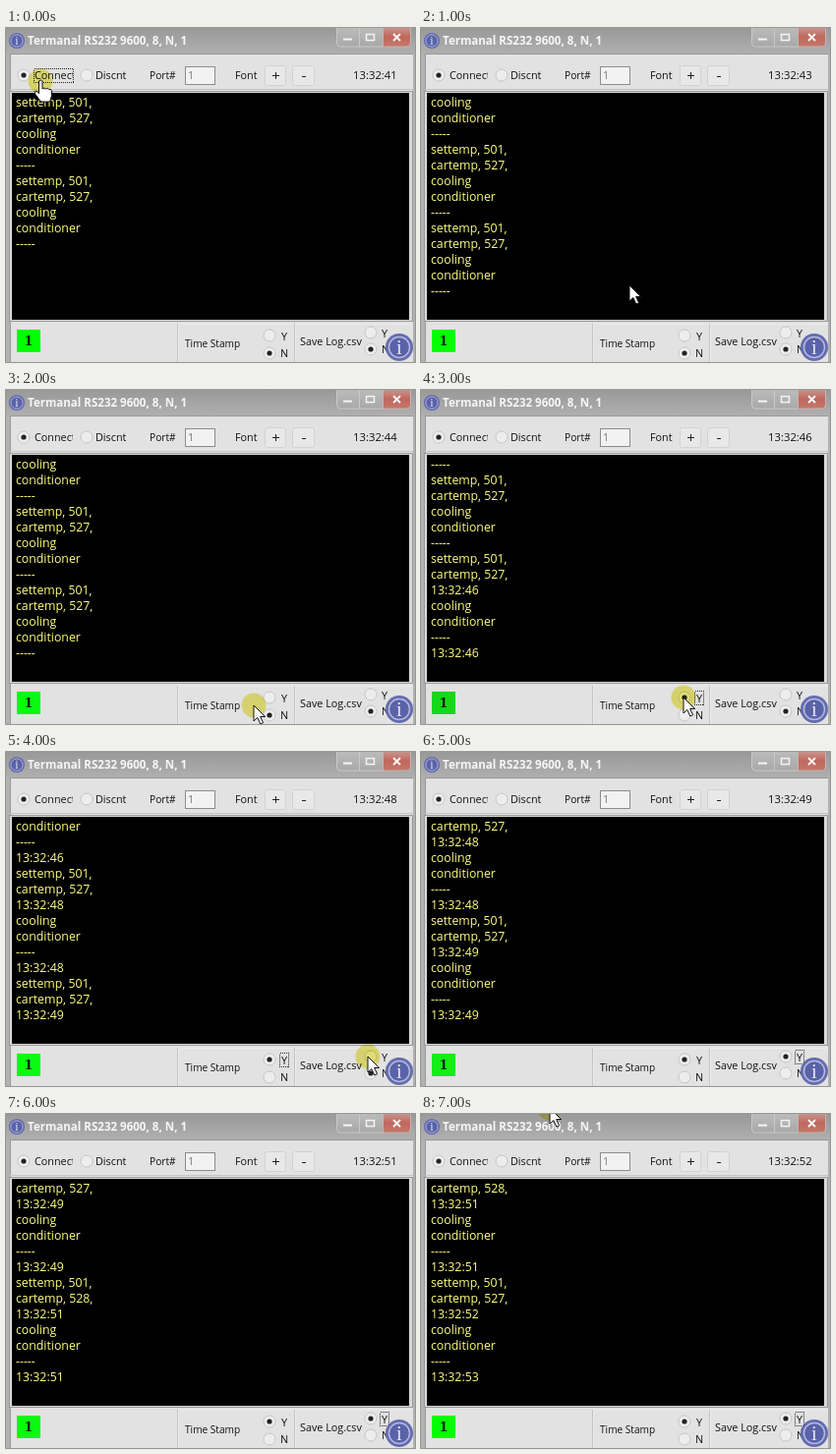
These frames come from a looping animation (416 by 340 pixels, 8000 ms). An HTML page:

```html
<!DOCTYPE html>
<html lang="en">
<head>
<meta charset="utf-8">
<title>Serial terminal</title>
<style>
  html, body { margin: 0; width: 100%; height: 100%; overflow: hidden; background: #b2b2b2; }
  svg { display: block; width: 416px; height: 340px; font: 10.8px "Open Sans", sans-serif; fill: #111; }
  text { white-space: pre; }
  .title { font-weight: 700; font-size: 11.55px; fill: #f6f6f6; }
  .log { font-size: 12.3px; fill: #ffff80; }
  .glass { fill: url(#glass); stroke: #c9c9c9; }
  .key { fill: #e8e8e8; stroke: #d2d2d2; }
  .ring { fill: #ededed; stroke: #c6c6c6; }
  .focus { fill: none; stroke: #222; stroke-dasharray: 1 1; shape-rendering: crispEdges; }
  .halo { fill: #ece650; opacity: .75; }
  .pointer { fill: #fff; stroke: #111; stroke-linejoin: round; }
  .info { font: 21px "Liberation Serif", serif; fill: #e2e4f4; text-anchor: middle; }
</style>
</head>
<body>
<svg viewBox="0 0 416 340">
  <defs>
    <linearGradient id="bar" x2="0" y2="1">
      <stop stop-color="#999"/><stop offset="1" stop-color="#b0b0b0"/>
    </linearGradient>
    <linearGradient id="glass" x2="0" y2="1">
      <stop stop-color="#bcbcbc"/><stop offset="1" stop-color="#a8a8a8"/>
    </linearGradient>
    <linearGradient id="red" x2="0" y2="1">
      <stop stop-color="#c89890"/><stop offset=".5" stop-color="#c0685c"/>
      <stop offset="1" stop-color="#c4786c"/>
    </linearGradient>
    <clipPath id="connectClip"><path d="M28 38h40v20H28z"/></clipPath>
    <g id="badge">
      <circle r="14" fill="#646cb0"/>
      <circle r="10.500" fill="#5a62a8" stroke="#b4badf" stroke-width="1.500"/>
      <text class="info" y="7">i</text>
    </g>
  </defs>

  <rect width="416" height="340" fill="#b2b2b2"/>
  <rect width="416" height="27" fill="url(#bar)"/>
  <use href="#badge" transform="translate(11 13) scale(.58)"/>
  <text class="title" x="22" y="17">Termanal RS232 9600, 8, N, 1</text>

  <path class="glass" d="M336.500-1v16q0 4 4 4h19V-1zM359.500-1h24v20h-24z"/>
  <path d="M383.500-1h28v16q0 4-4 4h-24z" fill="url(#red)" stroke="#c9b4b0"/>
  <path d="M343 11.500h9" stroke="#f4f4f4" stroke-width="2"/>
  <rect x="366.500" y="6.500" width="8" height="6" fill="none" stroke="#f4f4f4" stroke-width="1.500"/>
  <path d="M394 6l7 7m0-7l-7 7" stroke="#f4f4f4" stroke-width="2"/>

  <rect x="4" y="27" width="410" height="313" fill="#e2e2e2"/>
  <path d="M4 26.500h410M4.500 26v314" stroke="#999"/>
  <path d="M4 62.500h410" stroke="#c4c4c4"/>

  <g id="radios"></g>
  <text x="29" y="52" clip-path="url(#connectClip)">Connect</text>
  <text x="91" y="52">Discnt</text>
  <text x="146" y="52" font-size="10.200">Port#</text>
  <rect x="182.500" y="39.500" width="30" height="18" fill="#f2f2f2" stroke="#8c8c8c"/>
  <text x="185" y="52" fill="#777">1</text>
  <text x="233" y="52">Font</text>
  <rect class="key" x="263.500" y="38.500" width="21" height="20" rx="2"/>
  <rect class="key" x="291.500" y="38.500" width="22" height="20" rx="2"/>
  <path d="M271 48.500h7m-3.500-3.500v7M301 49.500h4" stroke="#222"/>
  <text id="clock" x="353" y="52" font-size="11.300"></text>

  <rect x="3.500" y="64.500" width="410" height="234" fill="#d8d8d8" stroke="#9a9a9a"/>
  <rect x="6" y="66" width="404" height="231" fill="#000"/>
  <g id="log" class="log"></g>

  <path d="M174.500 340v-39M293.500 340v-39" stroke="#c4c4c4"/>
  <path d="M175.500 340v-38.500H293M294.500 340v-38.500H414" fill="none" stroke="#ececec"/>
  <rect id="lamp" x="11" y="307" width="24" height="23"/>
  <text x="23" y="323" text-anchor="middle" font-family="DejaVu Serif, Noto Serif, serif" font-weight="700" font-size="12">1</text>
  <text x="182" y="325" font-size="10.100">Time Stamp</text>
  <text x="299" y="323">Save Log.csv</text>
  <text x="280" y="318">Y</text><text x="279" y="335">N</text>
  <text x="382" y="315">Y</text><text x="382" y="331">N</text>

  <rect id="focus" class="focus"/>
  <use href="#badge" x="400" y="325"/>

  <g id="cursor">
    <circle id="halo" class="halo" r="12.500"/>
    <path id="arrow" class="pointer" d="M0 0v16l3.800-3.500 3 6.500 2.800-1.300-3-6.200h5z"/>
    <path id="hand" class="pointer" d="M-1.500 0q2-2 3.500 0v8q2-2 3.500 0 2-1.500 3.300.5 2.200-.8 2.700 1.500v5l-2 6H.500l-6-8q-1-3 1.500-3l2.500 2.500z"/>
  </g>
</svg>
<script>
  const $ = id => document.getElementById(id);
  const SVG = 'http://www.w3.org/2000/svg';
  const add = (parent, tag, attrs) => {
    const node = document.createElementNS(SVG, tag);
    setAttrs(node, attrs);
    return $(parent).appendChild(node);
  };
  const setAttrs = (node, attrs) => {
    for (const name in attrs) node.setAttribute(name, attrs[name]);
  };
  const show = (node, on) => { node.style.display = on ? '' : 'none'; };

  const radio = (cx, cy) => {
    add('radios', 'circle', { cx, cy, r: 6, class: 'ring' });
    return add('radios', 'circle', { cx, cy, r: 2.6, fill: '#222' });
  };
  radio(18, 48);
  show(radio(82, 48), false);
  const stampYes = radio(268, 313), stampNo = radio(268, 331);
  const saveYes = radio(371, 310), saveNo = radio(371, 327);

  // The device repeats one report; stamped reports carry two times.
  const report = (first, second, temp = 527) => [
    'settemp, 501,', `cartemp, ${temp},`, first && `13:32:${first}`,
    'cooling', 'conditioner', '-----', second && `13:32:${second}`
  ].filter(Boolean);
  const stream = [
    ...Array.from({ length: 5 }, () => report()),
    report(46, 46), report(48, 48), report(49, 49),
    report(51, 51, 528), report(52, 53)
  ].flat();

  const ROWS = 13;
  const rows = Array.from({ length: ROWS }, (_, i) => add('log', 'text', { x: 10, y: 80 + 16 * i }));

  const focusBoxes = {
    connect: { x: 28.5, y: 41.5, width: 40, height: 14 },
    stamp: { x: 278.5, y: 306.5, width: 9, height: 14 },
    save: { x: 380.5, y: 303.5, width: 9, height: 14 }
  };

  const scenes = [
    { sec: 41, end: 10, lamp: '#0f0', focus: 'connect', at: [35, 54] },
    { sec: 43, end: 15, lamp: '#0f0', at: [212, 262] },
    { sec: 44, end: 20, lamp: '#08f810', at: [252, 321] },
    { sec: 46, end: 32, lamp: '#14d81a', focus: 'stamp', stamp: true, at: [267, 313] },
    { sec: 48, end: 42, lamp: '#0cfa12', focus: 'stamp', stamp: true, at: [368, 310] },
    { sec: 49, end: 46, lamp: '#12ee16', focus: 'save', stamp: true, save: true },
    { sec: 51, end: 53, lamp: '#0cf812', focus: 'save', stamp: true, save: true },
    { sec: 52, end: 60, lamp: '#0f0', focus: 'save', stamp: true, save: true, at: [131, -6] }
  ];

  // The highlight darkens what it covers, so it vanishes on black.
  $('halo').style.mixBlendMode = 'multiply';

  function draw({ sec, end, lamp, focus, stamp, save, at }) {
    $('clock').textContent = `13:32:${sec}`;
    const start = Math.max(0, end - ROWS);
    rows.forEach((row, i) => {
      row.textContent = start + i < end ? stream[start + i] : '';
    });
    $('lamp').setAttribute('fill', lamp);
    show(stampYes, stamp);
    show(stampNo, !stamp);
    show(saveYes, save);
    show(saveNo, !save);
    show($('focus'), focus);
    if (focus) setAttrs($('focus'), focusBoxes[focus]);
    show($('cursor'), at);
    if (at) setAttrs($('cursor'), { transform: `translate(${at})` });
    show($('hand'), focus === 'connect');
    show($('arrow'), focus !== 'connect');
  }

  const began = performance.now();
  let current = -1;
  function tick() {
    const index = Math.floor((performance.now() - began) / 1000) % scenes.length;
    if (index !== current) draw(scenes[current = index]);
    requestAnimationFrame(tick);
  }
  tick();
</script>
</body>
</html>
```
